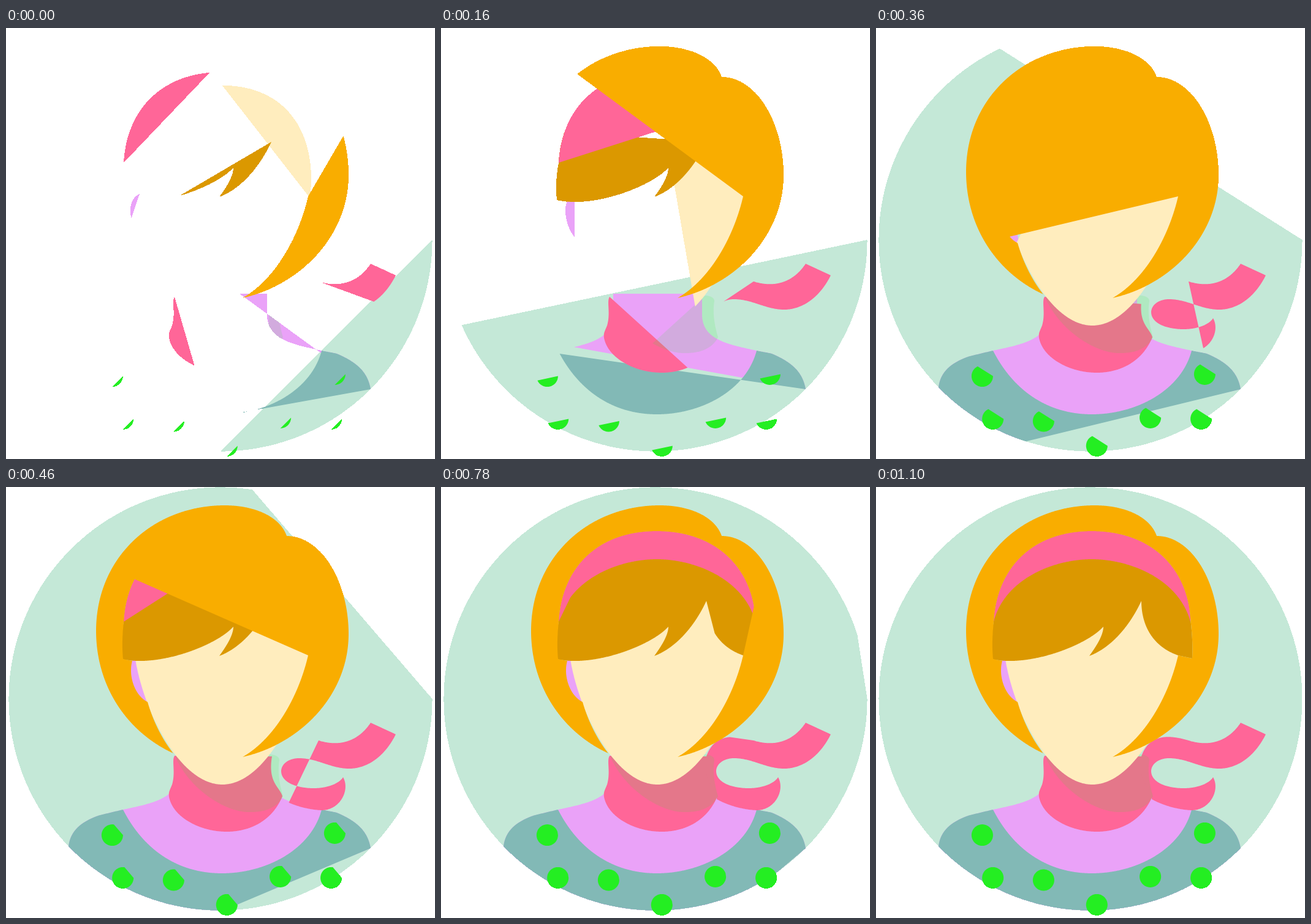
Write an HTML page with a canvas that moves like this. It is 700 by 704 pixels and loops after 1.6 s.

```html
<!DOCTYPE html>
<html lang="en">
<head>
<meta charset="utf-8">
<title>Portrait drawing itself</title>
<style>
html, body { margin: 0; width: 100%; height: 100%; overflow: hidden; background: #fff; }
canvas { display: block; width: 700px; height: 704px; }
</style>
</head>
<body>
<canvas id="stage" width="700" height="704"></canvas>
<script>
const LOOP = 1600, STEP = 20, W = 700, H = 704;
const ctx = document.getElementById('stage').getContext('2d', { willReadFrequently: true });

// Share of every outline drawn at a given time (ms)
const keys = [[0, .25], [160, .434], [260, .566], [460, .774],
  [620, .883], [780, .951], [1100, 1]];

const circle = (x, y, r) =>
  `M${x + r} ${y}A${r} ${r} 0 0 1 ${x - r} ${y}A${r} ${r} 0 0 1 ${x + r} ${y}`;

// Outlines shared by neighbouring shapes
const rightShoulder = 'M595 590C590 560 570 545 540 532C532 530 524 529 515 527';
const leftShoulder = 'C182 529 165 533 150 537C125 546 105 560 102 587A346 346 0 0 0 595 590';
const crown = 'C197 132 255 72 352 72C449 72 508 132 513 215';
const temple = 'C516 240 517 260 516 280L493 275';

const pink = '#ff6698', green = '#24ee22';
const dots = [[173.4, 568.6], [190.7, 638.4], [273.4, 642], [360.3, 682.4],
  [447.6, 636.4], [530.6, 638.4], [536.4, 565.4]];

const shapes = [
  ['#c4e8d7', circle(350, 346, 345.5)],
  // jumper neck
  ['#eaa2f8', rightShoulder +
    'C470 517 426 510 426 468L426 434L281 434L281 468C281 510 236 517 191 527' + leftShoulder],
  // jumper
  ['#82b9b6', rightShoulder +
    'C498 592 425 631 352 631C280 631 224 592 191 527' + leftShoulder],
  ...dots.map(([x, y]) => [green, circle(x, y, 17.5)]),
  // scarf tail
  [pink, 'M510 414C545 425 575 415 595 385L636 404C616 444 586 460 560 460' +
    'C530 460 508 443 478 443C461 443 449 453 449 464C449 482 473 492 502 492' +
    'C525 492 544 484 550 474C562 495 545 528 515 528C492 527 468 520 450 510' +
    'L450 504C444 489 424 480 433 440C446 402 480 405 510 414'],
  // scarf collar
  [pink, 'M275 439C270 447 277 465 271 486C267 496 265 498 266 506' +
    'C272 539 316 563 360 563C402 563 436 542 451 505C446 489 427 483 434 440L275 439'],
  // neck shadow
  ['rgba(34,238,34,.12)', 'M431 437C440 437 446 441 446 446C443 465 446 485 452 505' +
    'C442 526 418 531 400 531C360 533 300 495 276 440L431 437'],
  // ear
  ['#eaa2f8', 'M218 271C210 274 203 284 203 297C203 320 214 345 234 354L218 271'],
  // face
  ['#ffedbe', 'M353 94C450 94 498 160 498 247C498 330 432 486 353 486' +
    'C274 486 208 330 208 247C208 160 256 94 353 94'],
  // fringe
  ['#db9800', 'M433 186C415 225 385 262 348 276C358 262 371 243 371 228' +
    'C345 258 250 295 189 281C187 260 188 240 192 220' + crown + temple +
    'C455 262 433 230 433 186'],
  // headband
  [pink, 'M192 220' + crown + 'L513 220C494 150 414 118 352 118C290 118 210 150 192 220'],
  // hair
  ['#f9ad00', 'M493 275C478 340 440 410 386 441C480 420 559 340 559 240' +
    'C559 155 515 80 458 80C447 48 405 30 357 30C240 30 147 115 147 235' +
    'C147 325 197 400 273 435C256 414 240 383 231 351C214 343 204 320 204 300' +
    'C204 292 205 288 206 284L191 281C189 260 190 240 192 220' + crown + temple]
].map(([color, d]) => {
  const path = document.createElementNS('http://www.w3.org/2000/svg', 'path');
  path.setAttribute('d', d);
  const length = path.getTotalLength();
  const points = [];
  for (let s = 0; s <= length; s++) points.push(path.getPointAtLength(s));
  return { color, path, length, points };
});

// Speed at a key, from its two neighbours
function speed(i) {
  const last = keys.length - 1;
  if (i === last) return 0;
  const [a, b] = [keys[Math.max(i - 1, 0)], keys[i + 1]];
  const k = keys[i];
  const after = (b[1] - k[1]) / (b[0] - k[0]);
  if (i === 0) return after;
  const before = (k[1] - a[1]) / (k[0] - a[0]);
  return (before * (b[0] - k[0]) + after * (k[0] - a[0])) / (b[0] - a[0]);
}

// Smooth cubic curve through the keys
function partAt(t) {
  const i = keys.findIndex(k => k[0] > t) - 1;
  if (i < 0) return 1;
  const [t0, p0] = keys[i], [t1, p1] = keys[i + 1];
  const d = t1 - t0, u = (t - t0) / d, v = 1 - u;
  return p0 * v * v * (1 + 2 * u) + p1 * u * u * (3 - 2 * u) +
    d * u * v * (speed(i) * v - speed(i + 1) * u);
}

// Fills the outline up to the given share of its length
function fillPart(shape, part) {
  const end = shape.length * part;
  const tip = shape.path.getPointAtLength(end);
  ctx.beginPath();
  for (let i = 0; i <= end && i < shape.points.length; i++) {
    ctx.lineTo(shape.points[i].x, shape.points[i].y);
  }
  ctx.lineTo(tip.x, tip.y);
  ctx.closePath();
  ctx.fillStyle = shape.color;
  ctx.fill();
}

// Hard cut between picture and empty background
function crispEdges() {
  const image = ctx.getImageData(0, 0, W, H), px = image.data;
  for (let i = 3; i < px.length; i += 4) px[i] = px[i] < 128 ? 0 : 255;
  ctx.putImageData(image, 0, 0);
}

let shown = -1;
function draw(t) {
  const part = partAt(Math.floor(t / STEP) * STEP);
  if (part === shown) return;
  shown = part;
  ctx.clearRect(0, 0, W, H);
  shapes.forEach(shape => fillPart(shape, part));
  crispEdges();
}

const start = performance.now();
function tick() {
  draw((performance.now() - start) % LOOP);
  requestAnimationFrame(tick);
}
tick();
</script>
</body>
</html>
```
